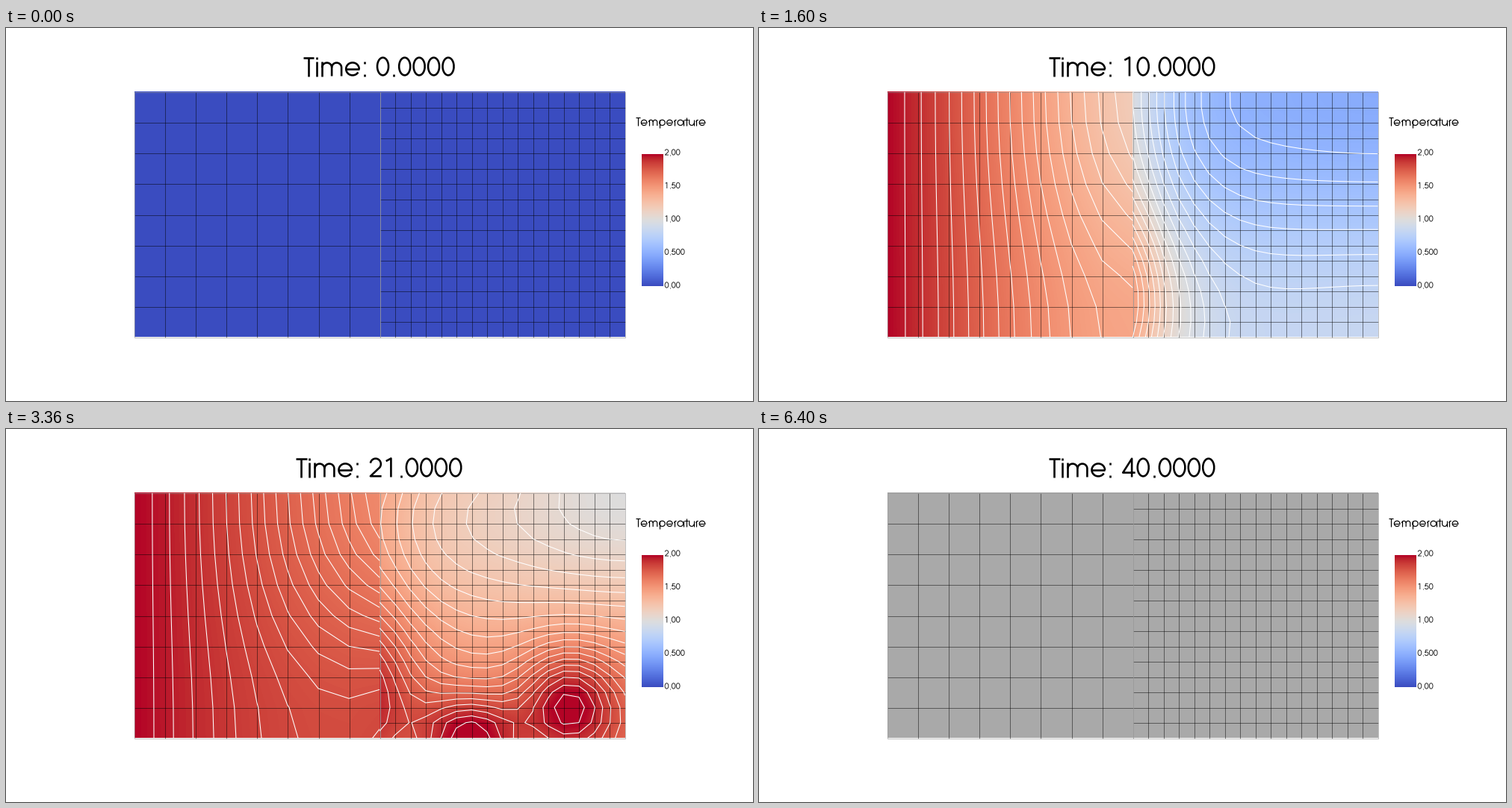
These frames come from a looping animation (1000x500 px, 6.56 s). A matplotlib script:

```python
import numpy as np
import matplotlib.pyplot as plt
from matplotlib.animation import FuncAnimation
from matplotlib.collections import LineCollection

FRAMES, INTERVAL = 41, 160
WARM_UP = 6              # until here the heat front is still entering
LAST_VALID = 28          # the solver output is NaN after this step
ISOTHERMS = 17
PX = 0.72                # points per pixel at 100 dpi
LEFT, TOP, SIZE = 171.7, 85.82, 328.4

# Lettering: geometric strokes in em units above the baseline.
X_HEIGHT, CAP, MID, DIGIT = .547, .705, .277, .554


def arc(cx, cy, rx, ry, start=0, end=360):
    a = np.radians(np.linspace(start, end, 28))
    return list(zip(cx + rx * np.cos(a), cy + ry * np.sin(a)))


def stem(x, top=X_HEIGHT, bottom=0):
    return [(x, bottom), (x, top)]


def bar(y, left, right):
    return [(left, y), (right, y)]


def bowl(cx, start=0, end=360):
    return arc(cx, X_HEIGHT / 2, .25, .242, start, end)


def arch(x, end=0):
    return arc(x + .185, .325, .185, .185, 180, end)


def ring(cy, r):
    return arc(MID, cy, r, r)


DOT = stem(MID / 2, .08)
SIX = [ring(.242, .21), [(.37, .74), (.105, .36)]]
NINE = [[(DIGIT - x, .74 - y) for x, y in line] for line in SIX]

# Character -> (advance, strokes)
GLYPHS = {
    " ": (MID, []),
    ".": (MID, [DOT]),
    ":": (MID, [DOT, stem(MID / 2, X_HEIGHT, .467)]),
    "T": (.426, [bar(CAP, .01, .416), stem(.213, CAP)]),
    "i": (.2, [stem(.1), stem(.1, .74, .655)]),
    "m": (.938, [stem(.1), arch(.1) + [(.47, 0)], arch(.47) + [(.84, 0)]]),
    "e": (.65, [bar(.26, .075, .575), bowl(.325, -3, 328)]),
    "p": (.682, [stem(.1, bottom=-.19), bowl(.35)]),
    "a": (.683, [stem(.58), bowl(.33)]),
    "r": (.301, [stem(.1), arch(.1, 92)]),
    "t": (.339, [stem(.17, .74), bar(.51, .02, .32)]),
    "u": (.608, [stem(.518),
                 [(.09, X_HEIGHT)] + arc(.304, .25, .214, .216, 180, 360)]),
    "0": (DIGIT, [arc(MID, .37, .215, .338)]),
    "1": (DIGIT, [[(.12, .61), (.31, .715), (.31, 0)]]),
    "2": (DIGIT, [arc(MID, .5, .2, .208, 170, -38) + bar(.035, .08, .5)]),
    "3": (DIGIT, [arc(MID, .54, .165, .168, 165, -90),
                  arc(MID, .203, .205, .17, 90, -165)]),
    "4": (DIGIT, [[(.4, 0), (.4, CAP)] + bar(.17, .06, .53)]),
    "5": (DIGIT, [bar(CAP, .46, .18) + arc(MID, .25, .215, .218, 140, -160)]),
    "6": (DIGIT, SIX),
    "7": (DIGIT, [bar(CAP, .04, .48) + [(.2, 0)]]),
    "8": (DIGIT, [ring(.55, .157), arc(MID, .21, .208, .175)]),
    "9": (DIGIT, NINE),
}


def strokes(text, x, baseline, em, centered=False):
    if centered:
        x -= em * sum(GLYPHS[c][0] for c in text) / 2
    result = []
    for char in text:
        advance, lines = GLYPHS[char]
        result += [[(x + em * u, baseline - em * v) for u, v in line]
                   for line in lines]
        x += em * advance
    return result


# Temperature: u runs from left to right, v from top to bottom of a block.

def ease(x):
    return (1 - np.cos(np.pi * x)) / 2


def bell(x, center, width):
    return np.exp(-((x - center) / width) ** 2)


def left_heat(u, v, t):
    """Fall from the heated wall to the interface, warmer towards the bottom."""
    bend = u * (1 - u) * ((.9 - .023 * t) * u - .33)
    lift = (.03 + .028 * t) * u ** 2.1 * ease(v)
    return 2 - 1.47 * np.exp(-t / 17) * (u + bend - lift)


def right_heat(u, v, t):
    """Inflow at the interface, a warm floor, and a spot that runs away."""
    base = 1.3 * (1 - np.exp((5 - t) / 11)) + (.1 + .027 * t) * ease(v)
    inflow = .67 - .02 * t + .2 * bell(v, .8, .3)
    inflow = inflow * np.exp(-(u / .18) ** 1.3)
    tilt = .015 * max(t - 8, 0) * (1 - 2 * v) * (1 - ease(u ** 1.5))
    eddy = .45 * np.clip((t - 12) / 5, 0, 1) * bell(u, .77, .19)
    eddy = eddy * bell(v, 1 - .035 * max(t - 17, 0), .22)
    runaway = 4.05 * np.exp((t - 25) / 2) * bell(u, .37, .21) * bell(v, 1, .17)
    return base + inflow + tilt + eddy + runaway


def temperature(heat, u, v, t):
    if t == 0:
        return np.zeros_like(u)
    if t > LAST_VALID:
        return np.full_like(u, np.nan)
    if t < WARM_UP:
        return 2 * (heat(u, v, WARM_UP) / 2) ** ((WARM_UP / t) ** .6)
    return heat(u, v, t)


class Block:
    """Square mesh with its own temperature field and isotherms."""

    def __init__(self, ax, x0, cells, heat):
        self.ax, self.heat, self.lines = ax, heat, None
        nodes = np.linspace(0, 1, cells + 1)
        self.u, self.v = np.meshgrid(nodes, nodes)
        self.x, self.y = x0 + SIZE * nodes, TOP + SIZE * nodes
        pixels = (np.arange(328) + .5) / 328
        self.fill = np.array([np.interp(pixels, nodes, row)
                              for row in np.eye(cells + 1)]).T
        self.image = ax.imshow(np.zeros((328, 328)), cmap=CMAP, vmin=0, vmax=2,
                               extent=(x0, x0 + SIZE, TOP + SIZE, TOP),
                               interpolation="nearest", aspect="auto")
        xs, ys = np.floor(self.x) + .5, np.floor(self.y) + .5
        (l, r), (t, b) = xs[[0, -1]], ys[[0, -1]]
        inner = [[(x, t), (x, b)] for x in xs[1:-1]]
        inner += [[(l, y), (r, y)] for y in ys[1:-1]]
        self.draw(inner, (0, 0, 0, .47))
        self.draw([[(l, t), (r, t), (r, b), (l, b), (l, t)]], (.6, .6, .6, .6))

    def draw(self, lines, color):
        self.ax.add_collection(LineCollection(lines, colors=[color],
                                              linewidths=PX, zorder=2))

    def show(self, t):
        values = temperature(self.heat, self.u, self.v, t)
        self.image.set_data(np.ma.masked_invalid(self.fill @ values @ self.fill.T))
        if self.lines:
            self.lines.remove()
            self.lines = None
        if 0 < t <= LAST_VALID:
            levels = np.linspace(values.min(), values.max(), ISOTHERMS + 2)[1:-1]
            self.lines = self.ax.contour(self.x, self.y, values, levels,
                                         colors="white", linewidths=1.05 * PX,
                                         linestyles="solid", zorder=3)


fig = plt.figure(figsize=(10, 5), dpi=100, facecolor="white")
ax = fig.add_axes([0, 0, 1, 1])
CMAP = plt.get_cmap("coolwarm").with_extremes(bad="#a9a9a9")

blocks = [Block(ax, LEFT, 8, left_heat), Block(ax, LEFT + SIZE, 16, right_heat)]

# Colour bar
ax.imshow(np.linspace(2, 0, 256)[:, None], cmap=CMAP, vmin=0, vmax=2,
          extent=(851, 880, 346, 169), aspect="auto")


def add_text(lines, width, color="black"):
    text = LineCollection(lines, colors=color, linewidths=width * PX, zorder=4)
    return ax.add_collection(text)


title = add_text([], 2.6)
add_text(strokes("Temperature", 842.8, 131, 15.1), 1.2)
for i, label in enumerate(("2.00", "1.50", "1.00", "0.500", "0.00")):
    add_text(strokes(label, 881.4, 170.5 + 44.5 * i, 11), .95, "0.15")

ax.axis("off")


def update(frame):
    title.set_segments(strokes(f"Time: {frame:.4f}", 499.7, 64.5, 35.1, True))
    for block in blocks:
        block.show(frame)
    ax.set(xlim=(0, 1000), ylim=(500, 0))
    return []


anim = FuncAnimation(fig, update, frames=FRAMES, interval=INTERVAL,
                     init_func=lambda: update(0), repeat=True, repeat_delay=0)
plt.show()
```
